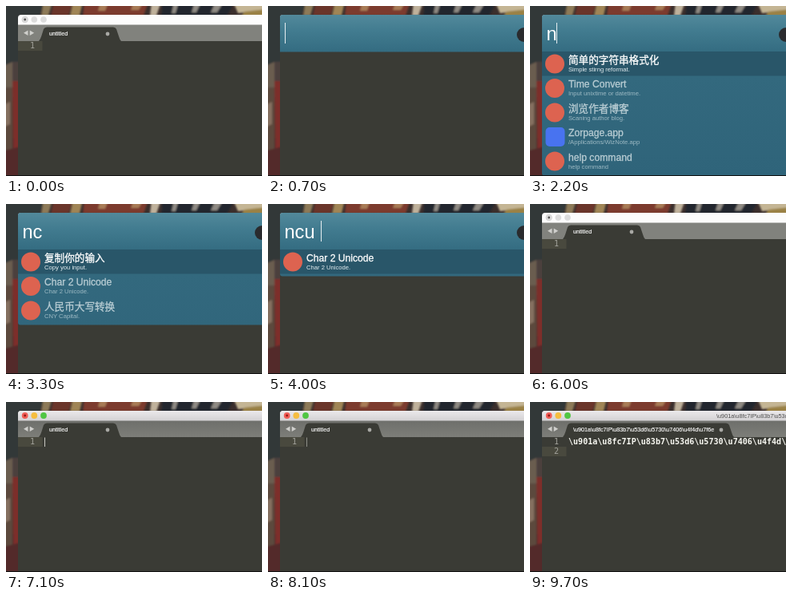
Animation, 320 px wide and 213 px high, one loop 9800 ms. Source, as an HTML page:

```html
<!DOCTYPE html>
<html lang="en">
<head>
<meta charset="utf-8">
<title>Launcher to editor</title>
<style>
html, body { margin: 0; width: 100%; height: 100%; overflow: hidden; background: #3a3b35; }
svg { display: block; width: 100vw; height: 100vh; }
text { white-space: pre; }
.ui { font-family: "Liberation Sans", "Noto Sans CJK SC", "Noto Sans CJK", sans-serif; }
.mono { font: 10.05px "DejaVu Sans Mono", "Liberation Mono", monospace; }
.query { font-size: 23.6px; fill: #fff; }
.query .long { font-size: 23.35px; }
.name { font-size: 12.15px; fill: #b9cdd4; stroke: #b9cdd4; stroke-width: .3px; }
.name.han { font-size: 12.6px; }
.note { font-size: 7.65px; fill: #9dbac4; }
.on .name { fill: #fff; stroke: #fff; }
.on .note { fill: #e3edf0; }
.tab { font-size: 7.2px; fill: #fff; stroke: #fff; stroke-width: .15px; }

/* 9.8 s loop, 1% = 98 ms */
[data-k] { animation: 9.8s step-end infinite; }
[data-k=panel] { animation-name: panel; animation-timing-function: linear; }
[data-k=n] { animation-name: n; }
[data-k=nc] { animation-name: nc; }
[data-k=ncu] { animation-name: ncu; }
[data-k=done] { animation-name: done; }
[data-k=focus] { animation-name: focus; }
[data-k=empty] { animation-name: empty; }
[data-k=pasted] { animation-name: pasted; }
[data-k=line2] { animation-name: line2; }
[data-k=row] { animation-name: row; }
[data-k=bar] { animation-name: bar; }
[data-k=blink] { animation-name: blink; animation-timing-function: linear; }
[data-k=cur] { animation-name: cur; }
[data-k=pulse] { animation-name: pulse; animation-timing-function: linear; }

@keyframes panel { 0%, .7% { opacity: 0 } 2.9%, 59.7% { opacity: 1 } 60.7%, 100% { opacity: 0 } }
@keyframes n { 0% { opacity: 0 } 8.06% { opacity: 1 } 23.37%, 100% { opacity: 0 } }
@keyframes nc { 0% { opacity: 0 } 23.37% { opacity: 1 } 35.61%, 100% { opacity: 0 } }
@keyframes ncu { 0% { opacity: 0 } 35.61% { opacity: 1 } 48.88%, 100% { opacity: 0 } }
@keyframes done { 0% { opacity: 0 } 48.88% { opacity: 1 } 61%, 100% { opacity: 0 } }
@keyframes focus { 0% { opacity: 0 } 71.35%, 100% { opacity: 1 } }
@keyframes empty { 0% { opacity: 1 } 88.67%, 100% { opacity: 0 } }
@keyframes pasted { 0% { opacity: 0 } 88.67%, 100% { opacity: 1 } }
@keyframes line2 { 0% { opacity: 0 } 92.76%, 100% { opacity: 1 } }
@keyframes row { 0% { transform: none } 92.76%, 100% { transform: translateY(12px) } }
@keyframes bar {
  0% { transform: translateX(21px) }
  8.06% { transform: translateX(33px) }
  23.37% { transform: translateX(46px) }
  35.61% { transform: translateX(59px) }
  39.69% { transform: translateX(66px) }
  48.88%, 100% { transform: translateX(296px) }
}
@keyframes blink {
  0%, 13.1% { opacity: 1 } 14.2%, 18.2% { opacity: 0 } 19.3%, 28.4% { opacity: 1 }
  29.5%, 33.8% { opacity: 0 } 34.6%, 44.7% { opacity: 1 } 45.8%, 48.8% { opacity: 0 }
  48.88%, 53.9% { opacity: 1 } 55%, 57.9% { opacity: 0 } 58.1%, 100% { opacity: 1 }
}
@keyframes cur {
  0% { transform: none }
  88.67% { transform: translateX(400px) }
  92.76%, 100% { transform: translateY(12px) }
}
@keyframes pulse {
  0%, 72.3% { opacity: 0 } 72.4%, 75.4% { opacity: 1 } 78.5%, 81.1% { opacity: 0 }
  83.7%, 86.7% { opacity: 1 } 88.6%, 92.7% { opacity: 0 }
  92.76%, 96.4% { opacity: 1 } 98.9%, 100% { opacity: 0 }
}
</style>
</head>
<body>
<svg viewBox="0 0 320 213" preserveAspectRatio="none">
  <defs>
    <linearGradient id="head" x2="0" y2="1">
      <stop offset="0" stop-color="#52899b"/>
      <stop offset=".45" stop-color="#417b8f"/>
      <stop offset="1" stop-color="#346c81"/>
    </linearGradient>
    <linearGradient id="list" gradientUnits="userSpaceOnUse" x1="0" y1="57" x2="0" y2="213">
      <stop offset="0" stop-color="#346a7f"/>
      <stop offset="1" stop-color="#2f647a"/>
    </linearGradient>
    <linearGradient id="chrome" x2="0" y2="1">
      <stop offset="0" stop-color="#ebe9eb"/>
      <stop offset="1" stop-color="#d2d0d2"/>
    </linearGradient>
    <linearGradient id="strip" x2="0" y2="1">
      <stop offset="0" stop-color="#6e6f6b"/>
      <stop offset="1" stop-color="#7d7e79"/>
    </linearGradient>
    <filter id="soft"><feGaussianBlur stdDeviation="1"/></filter>
    <clipPath id="field"><path d="M20 11H298V57H20Z"/></clipPath>
  </defs>

  <!-- wallpaper -->
  <path fill="#3b2f2d" d="M0 0H320V213H0Z"/>
  <g filter="url(#soft)">
    <path fill="#333739" d="M-5 -5H48L42 12H17V70L-5 78Z"/>
    <path fill="#6a5d50" d="M-5 76L8 70V104H-5Z"/>
    <path fill="#4b403c" d="M8 70H18V96H8Z"/>
    <path fill="#5c4a3d" d="M-5 102H8V184H-5Z"/>
    <path fill="#7d2f2b" d="M8 94H18V178L9 186Z"/>
    <path fill="#857060" d="M-3 124L5 120V148L-3 152Z"/>
    <path fill="#52292a" d="M-5 182L18 176V218H-5Z"/>
    <path fill="#8d7a58" d="M47 -5H58L53 12H44Z"/>
    <path fill="#6b352c" d="M60 -5H84L78 12H56Z"/>
    <path fill="#a08556" d="M84 -5H96L92 12H80Z"/>
    <path fill="#7b3b2e" d="M98 -5H178L172 12H96Z"/>
    <path fill="#a87b56" d="M118 -5H128L124 6H115ZM160 -5H172L166 5H156Z"/>
    <path fill="#bfb19b" d="M182 -5H194L188 12H180Z"/>
    <path fill="#22252e" d="M196 -5H286L276 13H194Z"/>
    <path fill="#8f8a83" d="M210 -5H216L212 9H207ZM236 -5H244L238 8H232ZM262 -5H272L264 8H256Z"/>
    <path fill="#c4b594" d="M284 -5H325V5L290 9Z"/>
    <path fill="#9a8145" d="M298 7L325 4V13H294Z"/>
  </g>

  <!-- editor -->
  <path fill="#3a3b35" d="M15 20H320V213H15Z"/>
  <path fill="#fcfcfc" d="M15 24V15Q15 11 19 11H320V24Z"/>
  <path fill="#81827d" d="M15 23.5H320V44H15Z"/>
  <g fill="#dcdcdc">
    <circle cx="23.7" cy="17" r="3.8" stroke="#c4c4c4" stroke-width=".5"/>
    <circle cx="35.3" cy="17" r="3.8"/>
    <circle cx="47" cy="17" r="3.8"/>
  </g>
  <circle cx="23.7" cy="17" r="1.4" fill="#555"/>
  <g data-k="focus">
    <path fill="url(#chrome)" d="M15 24V15Q15 11 19 11H320V24Z"/>
    <path fill="url(#strip)" d="M15 23.5H320V44H15Z"/>
    <circle cx="23.7" cy="17" r="3.9" fill="#f25d57"/>
    <circle cx="23.7" cy="17" r="1.4" fill="#8c1a16"/>
    <circle cx="35.3" cy="17" r="3.9" fill="#f5bd3f"/>
    <circle cx="47" cy="17" r="3.9" fill="#51c643"/>
  </g>
  <path fill="#cfcfcc" d="M27.5 30.5V37L22 33.7ZM29.7 30.5V37L35.2 33.7Z"/>
  <g class="ui" data-k="empty">
    <path fill="#3a3b35" d="M41 44Q43 42 44.5 37L47 29Q48 26.5 51 26.5H134Q137 26.5 138 29L141 38Q142 42 144 44Z"/>
    <text class="tab" x="54" y="37.3">untitled</text>
    <circle cx="127" cy="35" r="2.4" fill="#a9a9a5"/>
  </g>
  <g class="ui" data-k="pasted">
    <path fill="#3a3b35" d="M41 44Q43 42 44.5 37L47 29Q48 26.5 51 26.5H245Q248 26.5 249 29L252 38Q253 42 255 44Z"/>
    <text class="tab" x="54" y="37.3">\u901a\u8fc7IP\u83b7\u53d6\u5730\u7406\u4f4d\u7f6e</text>
    <circle cx="239" cy="35" r="2.4" fill="#a9a9a5"/>
    <text x="233" y="19.8" font-size="7.3" fill="#4c4c4c">\u901a\u8fc7IP\u83b7\u53d6\u5730\u7406</text>
  </g>
  <path data-k="row" fill="#49493e" d="M15 44H45.5V56H15Z"/>
  <g class="mono" fill="#a2a29b">
    <text x="30" y="53.3">1</text>
    <text x="30" y="65.3" data-k="line2">2</text>
    <text x="48" y="53.3" font-weight="bold" fill="#f8f8f2" data-k="pasted">\u901a\u8fc7IP\u83b7\u53d6\u5730\u7406\u4f4d\u7f6e</text>
  </g>
  <g data-k="cur"><path data-k="pulse" fill="#c9c9c2" d="M48 44.5H49V56H48Z"/></g>

  <!-- launcher -->
  <g class="ui" data-k="panel">
    <path fill="url(#head)" d="M15 57.5V14Q15 11 18 11H320V57.5Z"/>
    <circle cx="320" cy="36" r="9" fill="#2a2b2e"/>
    <g id="lists"></g>
    <g class="query" clip-path="url(#field)">
      <text x="20.5" y="43" data-k="n">n</text>
      <text x="20.5" y="43" data-k="nc">nc</text>
      <text x="20.5" y="43" data-k="ncu">ncu </text>
      <text class="long" x="295.5" y="43" text-anchor="end" data-k="done">ncu 通过IP获取地理位置信息</text>
    </g>
    <g data-k="bar"><path data-k="blink" fill="#e6eef1" d="M0 21H1V47H0Z"/></g>
  </g>
  <path fill="#111" d="M0 212H320V213H0Z"/>
</svg>
<script>
const pitch = 30.5, top0 = 57;
const disc = '<circle cx="31" cy="15.5" r="12" fill="#dd6350"/>';
const square = '<rect x="19.5" y="3.5" width="24" height="24" rx="5" fill="#4873f0"/>';
const info = '<circle cx="31" cy="15.5" r="10" fill="#5672d6" stroke="#a9b8e8"/>' +
  '<text x="31" y="21" text-anchor="middle" fill="#fff" ' +
  'style="font:italic bold 16px \'Liberation Serif\',serif">i</text>';

const lists = {
  n: [
    ['简单的字符串格式化', 'Simple stirng reformat.', disc],
    ['Time Convert', 'Input unixtime or datetime.', disc],
    ['浏览作者博客', 'Scaning author blog.', disc],
    ['Zorpage.app', '/Applications/WizNote.app', square],
    ['help command', 'help command', disc]
  ],
  nc: [
    ['复制你的输入', 'Copy you input.', disc],
    ['Char 2 Unicode', 'Char 2 Unicode.', disc],
    ['人民币大写转换', 'CNY Capital.', disc]
  ],
  ncu: [['Char 2 Unicode', 'Char 2 Unicode.', disc]],
  done: [[
    '汉字转Unicode 『通过IP获取地理位置信息』',
    '\\u901a\\u8fc7IP\\u83b7\\u53d6\\u5730\\u7406\\u4f4d\\u7f6e\\u4fe1\\u606f',
    info
  ]]
};

const han = s => /\p{Script=Han}/u.test(s) ? ' han' : '';

const row = ([name, note, icon], i) =>
  `<g class="${i ? '' : 'on'}" transform="translate(0 ${top0 + i * pitch})">
    ${i ? '' : `<path fill="#295669" d="M15 0H320V${pitch}H15Z"/>`}
    ${icon}
    <text class="name${han(name)}" x="48" y="14.6">${name}</text>
    <text class="note" x="48" y="24.6">${note}</text>
  </g>`;

const list = ([key, rows]) => {
  const end = top0 + rows.length * pitch + 3;
  return `<g data-k="${key}">
    <path fill="url(#list)" d="M15 ${top0}H320V${end}H18Q15 ${end} 15 ${end - 3}Z"/>
    ${rows.map(row).join('')}
  </g>`;
};

document.getElementById('lists').innerHTML = Object.entries(lists).map(list).join('');
</script>
</body>
</html>
```
